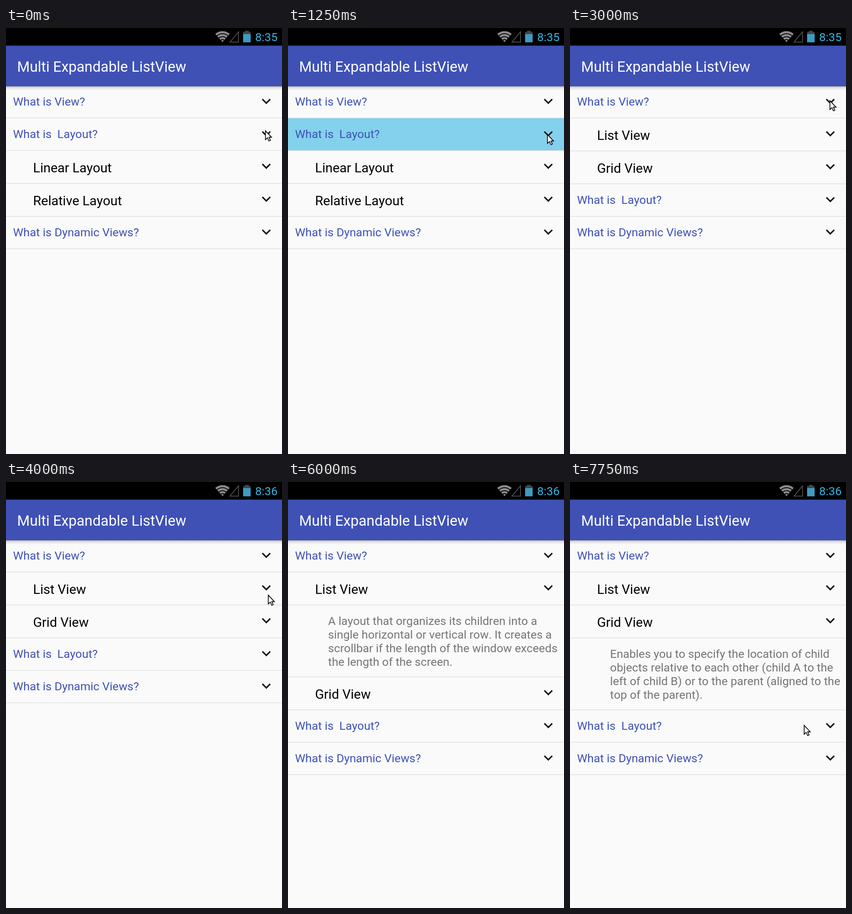
Write an HTML page that moves like this. It is 589 px wide and 906 px high and loops after 8 s.

```html
<!DOCTYPE html>
<html lang="en">
<head>
<meta charset="utf-8">
<title>Multi Expandable ListView</title>
<style>
html, body { margin: 0; height: 100%; overflow: hidden; background: #fafafa; }
svg { display: block; }
text { font-family: Roboto, "Open Sans", sans-serif; font-kerning: none; white-space: pre; }
.title { font-size: 30.9px; fill: #fff; }
.clock { font-size: 24.8px; fill: #33b5e5; }
.group { font-size: 24.8px; fill: #3f51b5; }
.child { font-size: 28px; fill: #000; }
.info { font-size: 24.7px; fill: #757575; }
</style>
</head>
<body>
<svg width="589" height="906" viewBox="0 0 589 906">
  <defs>
    <linearGradient id="shade" x2="0" y2="1">
      <stop offset="0" stop-opacity=".3"/>
      <stop offset=".35" stop-opacity=".1"/>
      <stop offset="1" stop-opacity="0"/>
    </linearGradient>
    <path id="chevron" d="M7.3-5.7 0 1.6-7.3-5.7-9.5-3.4 0 6.1 9.5-3.4Z" fill="#161616"/>
  </defs>
  <rect width="589" height="906" fill="#fafafa"/>
  <g id="list"></g>
  <rect y="124" width="589" height="9" fill="url(#shade)"/>
  <rect width="589" height="38" fill="#000"/>
  <rect y="37.5" width="589" height="86.500" fill="#3f51b5"/>
  <text class="title" x="23.8" y="92.500">Multi Expandable ListView</text>
  <g id="wifi" fill="none" stroke="#8c8c8c" stroke-width="4.4"></g>
  <path d="M478 30H496.300V8Z" fill="none" stroke="#5a5a5a" stroke-width="1.5"/>
  <path d="M510 6h8v2.500h4V13h-16V8.500h4Z" fill="#444"/>
  <rect x="506" y="13" width="16" height="17.500" fill="#3a9cc4"/>
  <text class="clock" id="clock" x="531.8" y="28"></text>
  <path id="cursor" d="M.7 1.6V20.400L5 16.500 8.200 23.300 11.200 21.900 8.200 15.400H13.800Z"
    fill="#fff" stroke="#000" stroke-width="1.6"/>
</svg>
<script>
const $ = id => document.getElementById(id);
const LOOP = 8000;

const listInfo = ["A layout that organizes its children into a",
  "single horizontal or vertical row. It creates a",
  "scrollbar if the length of the window exceeds",
  "the length of the screen."];
const gridInfo = ["Enables you to specify the location of child",
  "objects relative to each other (child A to the",
  "left of child B) or to the parent (aligned to the",
  "top of the parent)."];

const group = (text, lit) => ({ type: "group", lines: [text], x: 15, base: 43, h: 69.2, arrow: true, lit });
const child = text => ({ type: "child", lines: [text], x: 57.8, base: 47, h: 69.8, arrow: true });
const info = lines => ({ type: "info", lines, x: 85.6, base: 43, h: 152.8 });

const view = group("What is View?"), layout = group("What is  Layout?");
const dynamic = group("What is Dynamic Views?");
const list = child("List View"), grid = child("Grid View");
const layouts = [child("Linear Layout"), child("Relative Layout")];

// [start time, rows]
const screens = [
  [0, [view, layout, ...layouts, dynamic]],
  [1250, [view, group("What is  Layout?", true), ...layouts, dynamic]],
  [1500, [view, layout, dynamic]],
  [3000, [view, list, grid, layout, dynamic]],
  [4750, [view, list, info(listInfo), grid, layout, dynamic]],
  [7000, [view, list, grid, info(gridInfo), layout, dynamic]]
];

// [start time, x, y]; without a position the pointer is hidden
const moves = [
  [0, 553, 217], [250, 553, 225], [1750, 544, 170], [2000, 546, 166],
  [2250, 554, 153], [3500, 555, 161], [3750, 559, 218], [4000, 559, 239],
  [5500, 304, 285], [5750, 431, 377], [6000], [6500, 564, 449],
  [6750, 562, 449], [7000, 512, 572], [7250, 338, 881], [7500, 327, 882],
  [7750, 499, 516]
];

const at = (steps, t) => steps.findLast(s => s[0] <= t);

function drawRows(rows) {
  let y = 122;
  return rows.map(row => {
    const top = Math.round(y), bottom = Math.round(y += row.h);
    const back = row.lit
      ? `<rect y="${top + 1}" width="589" height="${bottom - top - 1}" fill="#83d1ed"/>` : "";
    const text = row.lines.map((line, i) =>
      `<text class="${row.type}" x="${row.x}" y="${top + row.base + i * 29.1}">${line}</text>`).join("");
    const arrow = row.arrow ? `<use href="#chevron" x="555.5" y="${top + 34}"/>` : "";
    return `${back}<rect y="${bottom}" width="589" height="1" fill="#d5d5d5"/>${text}${arrow}`;
  }).join("");
}

$("wifi").innerHTML = [2.2, 8.6, 14.8, 21].map(r => {
  const dx = r * 0.66, y = 30 - r * 0.75;
  return `<path d="M${462 - dx} ${y}A${r} ${r} 0 0 1 ${462 + dx} ${y}"/>`;
}).join("");

let shown;
function frame(now) {
  const t = now % LOOP;
  const screen = at(screens, t), [, x, y] = at(moves, t);
  if (screen !== shown) {
    shown = screen;
    $("list").innerHTML = drawRows(screen[1]);
  }
  $("clock").textContent = t < 4000 ? "8:35" : "8:36";
  $("cursor").setAttribute("visibility", x === undefined ? "hidden" : "visible");
  if (x !== undefined) $("cursor").setAttribute("transform", `translate(${x} ${y})`);
  requestAnimationFrame(frame);
}
frame(0);
</script>
</body>
</html>
```
